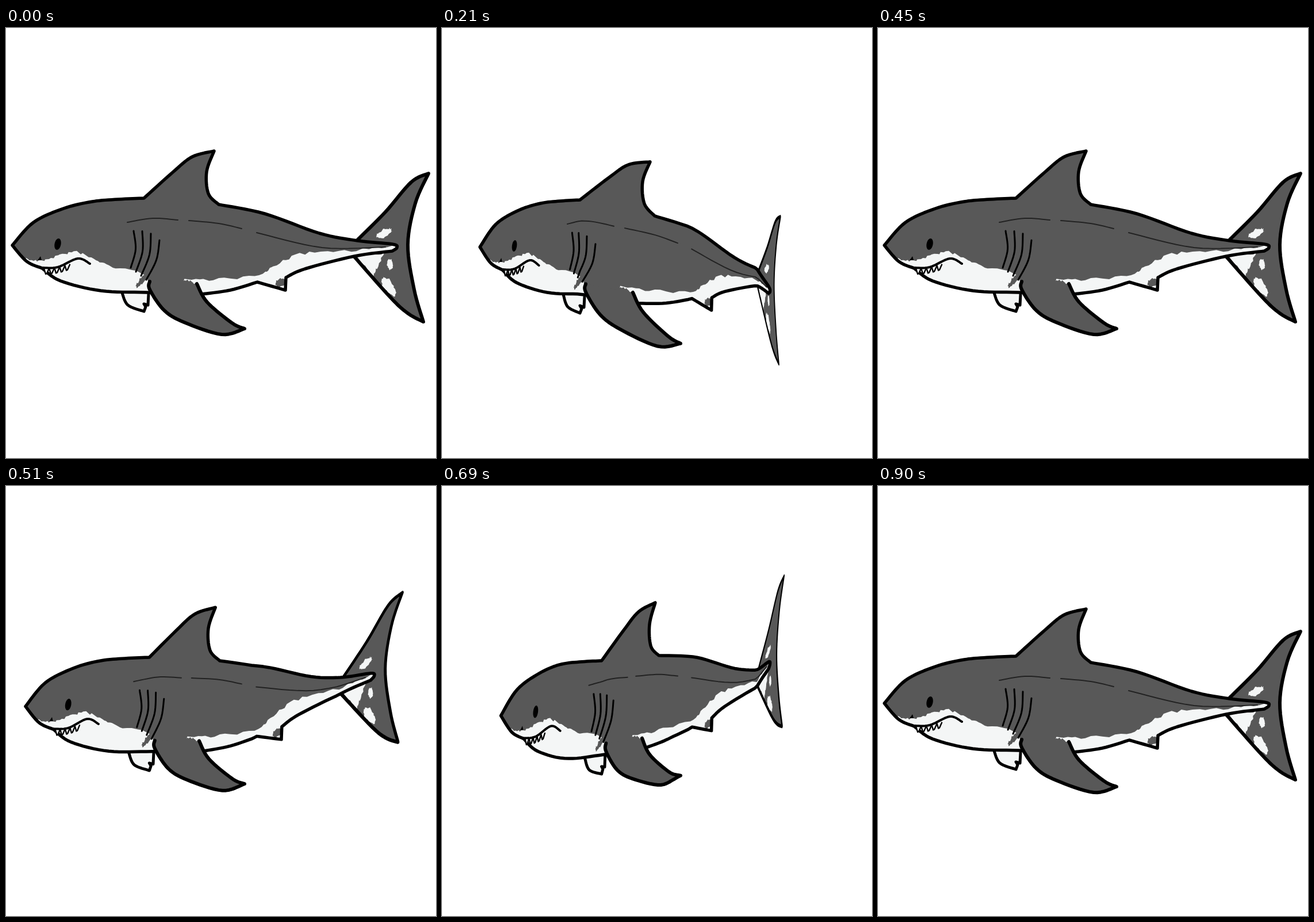
Animation, 748 px wide and 748 px high, one loop 0.93 s. Source, as an HTML page with a canvas:

```html
<!DOCTYPE html>
<html lang="en">
<head>
<meta charset="utf-8">
<title>Swimming shark</title>
<style>
  html, body { margin: 0; width: 100%; height: 100%; overflow: hidden; background: #fff; }
  canvas { display: block; width: 748px; height: 748px; }
</style>
</head>
<body>
<canvas id="stage" width="748" height="748"></canvas>
<script>
const ctx = document.getElementById('stage').getContext('2d');
const GREY = '#585858', PALE = '#f4f6f6', INK = '#000';
const STEP = 30, LOOP = 930, REST = 450;
const ROOT = [610, 383], FIN_REACH = 120;

let seed = 7;
const random = () => {
  seed = (seed * 16807) % 2147483647;
  return seed / 2147483647 - 0.5;
};

// Catmull-Rom between b and c
function spline(a, b, c, d, t) {
  const k1 = c - a;
  const k2 = 2 * a - 5 * b + 4 * c - d;
  const k3 = 3 * (b - c) + d - a;
  return b + 0.5 * t * (k1 + t * (k2 + t * k3));
}

function smooth(pts, n = 8) {
  const out = [pts[0]];
  for (let i = 0; i < pts.length - 1; i++) {
    const a = pts[i - 1] || pts[i], b = pts[i], c = pts[i + 1], d = pts[i + 2] || c;
    for (let j = 1; j <= n; j++) out.push([0, 1].map(k => spline(a[k], b[k], c[k], d[k], j / n)));
  }
  return out;
}

// Smooth line through "x,y x,y"; a bar marks a corner.
function curve(text) {
  let out = [];
  for (const part of text.split('|')) {
    const run = part.trim().split(' ').map(p => p.split(',').map(Number));
    out = out.concat(smooth(out.length ? [out[out.length - 1], ...run] : run));
  }
  return out;
}

const rough = (pts, amp) => pts.map(([x, y]) => [x + random() * amp * 0.6, y + random() * amp]);

function blob(x, y, rx, ry, tilt = 0, amp = 0) {
  const pts = Array.from({ length: 30 }, (_, i) => {
    const a = i / 30 * 2 * Math.PI, u = rx * Math.cos(a), v = ry * Math.sin(a);
    return [x + u * Math.cos(tilt) - v * Math.sin(tilt), y + u * Math.sin(tilt) + v * Math.cos(tilt)];
  });
  return rough(pts, amp);
}

const body = curve('11,378 48,338 100,314 150,302 195,298 240,296|290,251 324,224 362,214|' +
  '349,250 352,288 370,307|450,323 545,357 612,370 672,376 680,382 672,388|606,397 520,419 487,434|486,456|' +
  '437,442|390,456 340,463|245,460 165,457 95,440 63,418|36,406 11,378');
const pectoral = curve('250,441 250,455 275,491 310,512 375,533 415,523|393,513 350,477 332,445');
const farFin = curve('202,461 212,482 240,493|243,485|240,480|247,482|248,463');
const belly = [
  '34,401 58,405 90,396 122,390 152,402 185,415 246,428|252,470|20,470|34,401',
  '309,437 360,437 440,430 470,411 520,392 600,387 677,380|684,400|490,470|330,475|326,443|309,438'
].map(s => rough(curve(s), 5));
const smudges = [blob(237, 439, 16, 4, -0.8, 4), blob(478, 443, 10, 7, -0.5, 3)];
const mouth = curve('63,417 90,416 125,401 146,410');
const eye = blob(90, 376, 5.5, 10, 0.2);
const nostril = [[55, 404], [60, 397], [62, 404]];
const sideLines = ['211,338 255,331 299,334', '318,335 370,340 410,349', '436,356 550,382 660,381'].map(curve);

const gills = [0, 1, 2, 3].map(i => {
  const top = [222 + 15 * i, 353 + 0.6 * i ** 3], end = [217 + 9 * i, 417 + 7 * i];
  return smooth([top, [(top[0] + end[0]) / 2 + 6, (top[1] + end[1]) / 2], end]);
});
const teeth = [0, 1, 2, 3, 4].flatMap(i => {
  const x = 66 + 9 * i, y = 418 - 0.4 * i * i;
  return [[x, y], [x + 3, y + 10], [x + 5, y + 9], [x + 9, y]];
});

const fin = curve('735,253|712,305 699,377 710,455 726,511|700,497 670,470 606,398|612,368|660,320 705,268 735,253');
const finPatches = [
  rough(curve('610,397|657,392|648,412 638,432|610,397'), 4),
  blob(658, 357, 14, 6, -0.4, 4), blob(668, 411, 5, 9, 0, 3), blob(666, 450, 19, 8, 0.9, 5)
];

// Both strokes squeeze the tail; the head turns and the spine slopes per stroke.
// reach and lift of the tail fin: halfway, then at the peak.
const shorten = x => -0.31 * Math.max(0, x - 430) - 0.4 * Math.max(0, x - 600);
const down = {
  from: 0, peak: 210, to: REST, reach: [44, 37], lift: [31, 21],
  bend(x) {
    const head = Math.max(0, 240 - x), rear = Math.max(0, x - 240), tip = Math.max(0, x - 600);
    return [0.24 * head + shorten(x), 3 + 0.13 * rear + 0.2 * tip];
  },
  bow: w => [-23 * w ** 4, 14 * w ** 4]
};
const up = {
  from: REST, peak: 690, to: 900, reach: [79, 43], lift: [-46, -43],
  bend(x, y) {
    const head = Math.max(0, 240 - x), rear = Math.max(0, x - 240), tip = Math.max(0, x - 600);
    const pitch = 0.06 * head + 0.08 * (y - 380) * Math.min(1, head / 100);
    return [0.235 * Math.max(0, 400 - x) + shorten(x), 8 + pitch - 0.156 * rear - 0.15 * tip];
  },
  bow: w => [-16 * w, -45 * w]
};

function poseAt(t) {
  const side = t < REST ? down : up;
  const rising = t < side.peak;
  const p = Math.max(0, rising ? (t - side.from) / (side.peak - side.from) : (side.to - t) / (side.to - side.peak));
  return { side, p, arc: 4 * p * (1 - p), swing: side === down && rising ? 26 : 0 };
}

function place([x, y], { side, p, arc, swing }) {
  const w = Math.min(1, Math.max(0, (x - 430) / 250));
  const [dx, dy] = side.bend(x, y), [bx, by] = side.bow(w);
  return [x + p * dx + arc * bx, y + p * dy + arc * (by + swing * w)];
}

function trace(pts) {
  const path = new Path2D();
  pts.forEach(([x, y]) => path.lineTo(x, y));
  return path;
}

function fill(path, color) {
  ctx.fillStyle = color;
  ctx.fill(path);
}

function stroke(path, width, color = INK) {
  ctx.lineWidth = width;
  ctx.strokeStyle = color;
  ctx.stroke(path);
}

function drawFin(pose) {
  const { side, p, arc } = pose;
  const through = (rest, [mid, end]) => rest + p * (end - rest) + arc * (mid - (rest + end) / 2);
  const [x, y] = place(ROOT, pose);
  ctx.save();
  ctx.transform(through(FIN_REACH, side.reach) / FIN_REACH, through(0, side.lift) / FIN_REACH, 0, 1, x, y);
  ctx.translate(-ROOT[0], -ROOT[1]);
  const shape = trace(fin);
  shape.closePath();
  fill(shape, GREY);
  finPatches.forEach(s => fill(trace(s), PALE));
  stroke(shape, 6);
  ctx.restore();
}

function draw(t) {
  const pose = poseAt(t);
  const path = pts => trace(pts.map(q => place(q, pose)));
  ctx.clearRect(0, 0, 748, 748);
  ctx.lineJoin = ctx.lineCap = 'round';

  drawFin(pose);
  fill(path(farFin), PALE);
  stroke(path(farFin), 5);

  const skin = path(body);
  skin.closePath();
  fill(skin, GREY);
  ctx.save();
  ctx.clip(skin);
  belly.forEach(s => fill(path(s), PALE));
  smudges.forEach(s => fill(path(s), GREY));
  ctx.restore();
  sideLines.forEach(s => stroke(path(s), 2, '#222'));
  stroke(skin, 5.5);

  fill(path(teeth), PALE);
  stroke(path(teeth), 2.4);
  stroke(path(mouth), 4);
  fill(path(eye), INK);
  fill(path(nostril), INK);
  gills.forEach(s => stroke(path(s), 3));

  fill(path(pectoral), GREY);
  stroke(path(pectoral), 6);
}

const origin = performance.now();
function tick() {
  const t = (performance.now() - origin) % LOOP;
  draw(Math.floor(t / STEP) * STEP);
  requestAnimationFrame(tick);
}
tick();
</script>
</body>
</html>
```
